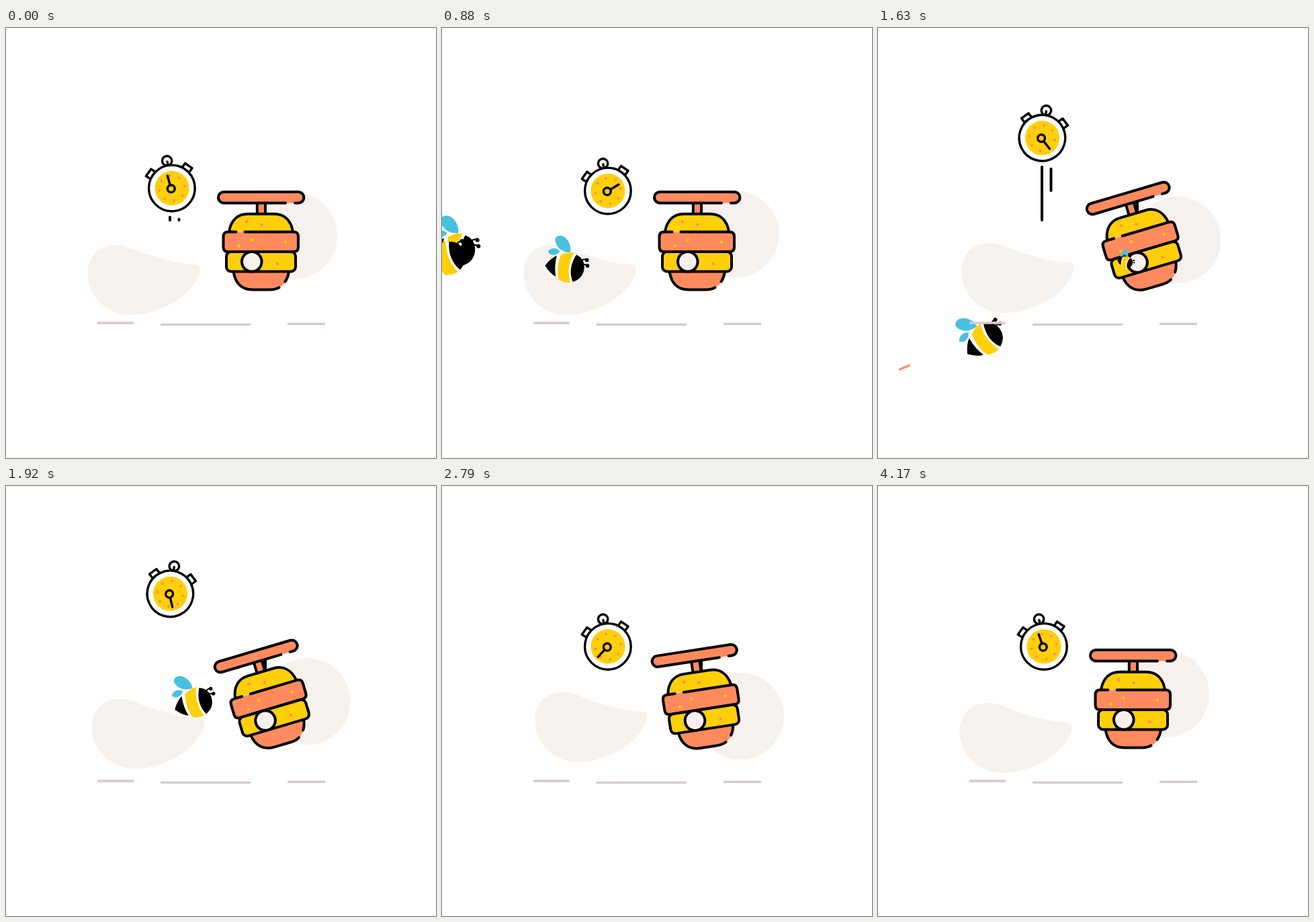
Write an HTML page that moves like this. It is 640 by 640 pixels and loops after 4210 ms.

```html
<!DOCTYPE html>
<html lang="en">
<head>
<meta charset="utf-8">
<title>Bees and hive</title>
<style>
  html, body { margin: 0; width: 100%; height: 100%; overflow: hidden; background: #fff; }
  svg { display: block; width: 100vw; height: 100vh; }
  .ink { stroke: #000; stroke-width: 4; stroke-linecap: round; stroke-linejoin: round; }
  .thin { stroke-width: 3.4; }
  .coral { fill: #ff8a5e; }
  .gold { fill: #ffcf0a; }
  .pale { fill: #f7f1ee; }
  .white { fill: #fff; }
  .sky { fill: #48c0e0; }
  .none { fill: none; }
  .dots { stroke-width: 4.4; stroke-linecap: round; }
</style>
</head>
<body>
<svg viewBox="0 0 640 640">
  <defs>
    <g id="bee">
      <path class="sky" d="M6,-22C-6,-22 -17,-32 -15,-44C-12,-49 -4,-49 1,-43C6,-37 8,-30 6,-22Z"/>
      <path class="sky" d="M-9,-24C-15,-17 -25,-18 -27,-25C-22,-31 -13,-30 -9,-24Z"/>
      <path class="white" d="M-14,-18Q2,-24 15,-18L8,22Q-4,25 -17,13Z"/>
      <path d="M-32,-4Q-24,-14 -14,-18Q-19,-2 -17,13Q-26,8 -32,-4Z"/>
      <path class="gold" d="M-8,-19Q2,-23 12,-21Q-1,-2 4,23Q-6,23 -13,17Q-16,0 -8,-19Z"/>
      <path d="M15,-18Q27,-12 26,2Q24,18 8,22Q1,2 15,-18Z"/>
      <path class="ink none" style="stroke-width:2" d="M21,-8Q25,-12 30,-10M24,-3Q27,-4 30,-1"/>
      <circle cx="30.5" cy="-9.5" r="2.8"/><circle cx="31" cy="-1" r="2.8"/>
    </g>
  </defs>

  <path id="blob" class="pale" d="M121.5,366C121,340 138,323 163,323C182,323 190,331 214,338C238,345 255,350 277,352C287,350 291,356 288,365C283,382 265,400 245,411C225,421 205,427 186,427C147,427 121.5,397 121.5,366Z"/>
  <circle id="disc" class="pale" cx="428.3" cy="309.3" r="64.6"/>

  <path d="M372,258H388V277H372Z"/>
  <g id="hive">
    <path class="ink coral" d="M373.8,260V278H386V260"/>
    <path class="ink coral" d="M430,260.4H435.2a8.2,8.2 0 0 0 0,-16.4H324.2a8.2,8.2 0 0 0 0,16.4H416"/>
    <path class="ink gold" d="M332,303C335,286 345,276.8 360,276.8H399C414,276.8 424,286 427,303"/>
    <path class="coral" d="M338.5,362C341,380 351,389.5 367,389.5H393C409,389.5 419,379 421,362Z"/>
    <path class="ink none" d="M338.5,362C341,380 351,389.5 367,389.5H393Q401,389.5 406.5,386.3M415.5,377.5Q420,371 421,362"/>
    <path class="ink coral" d="M355.5,303.6H428q7,0 7,7V326q0,7 -7,7H330.5q-7,0 -7,-7V310.6q0,-7 7,-7H342.5"/>
    <rect class="ink gold" x="328" y="333" width="103" height="29.5" rx="7"/>
    <circle class="ink pale" cx="365.8" cy="347.8" r="14.8"/>
    <path class="dots" stroke="#ff8a5e" d="M358,288.5h0M380.5,293h0M404,351h0"/>
    <path class="dots" stroke="#ffcf0a" d="M365.5,315.5h0M416,318.5h0M346.5,324.5h0"/>
  </g>

  <path id="speed" class="ink none"/>
  <g id="watch">
    <circle class="ink thin white" cx="239.6" cy="198.2" r="7.2"/>
    <path class="ink thin white" d="M215.8,210.5L222.2,214.8L214.8,225.3L208.3,221ZM266.6,201.8L277,209L272.5,215.5L262,208.3Z"/>
    <circle class="ink thin white" cx="246.9" cy="238.9" r="34.3"/>
    <path class="ink thin none" d="M239.9,199.5L241,205"/>
    <circle class="gold" cx="247" cy="238.9" r="25.6"/>
    <g id="ticks" class="coral"></g>
    <path id="hand" class="ink thin none" d="M245.8,234V219.7"/>
    <circle class="ink thin gold" cx="245.8" cy="239.7" r="5.4"/>
  </g>

  <path id="streak" class="none" stroke="#ff8a5e" stroke-width="3" stroke-linecap="round"/>
  <g id="bees"></g>
  <path class="none" stroke="#d9c8cc" stroke-width="3.4" d="M136,439H190M230,441.4H364M419,440.4H475"/>
</svg>
<script>
const LOOP = 4210, HOP = LOOP / 3, TURN = 2790;
const byId = id => document.getElementById(id);
const make = (tag, parent, attrs) => {
  const node = document.createElementNS('http://www.w3.org/2000/svg', tag);
  for (const key in attrs) node.setAttribute(key, attrs[key]);
  return parent.appendChild(node);
};
const transform = (node, value) => node.setAttribute('transform', value);

// Progress of t from start to end, 0 to 1, and its eased forms.
const ramp = (t, start, end) => Math.min(1, Math.max(0, (t - start) / (end - start)));
const easeIn = (...span) => ramp(...span) ** 2;
const easeOut = (...span) => 1 - (1 - ramp(...span)) ** 2;
const ease = (...span) => { const u = ramp(...span); return u * u * (3 - 2 * u); };

const bezier = (a, b, c, d, u) => {
  const v = 1 - u;
  return a * v ** 3 + 3 * b * v * v * u + 3 * c * v * u * u + d * u ** 3;
};
const bezierSlope = (a, b, c, d, u) => {
  const v = 1 - u;
  return (b - a) * v * v + 2 * (c - b) * u * v + (d - c) * u * u;
};

// Each bee follows one curve into the hive's door.
const flights = [
  { start: 420, end: 1150, size: 1, x: [-45, 90, 164.6, 366], y: [335, 372, 354, 348] },
  { start: 740, end: 1480, size: 1.1, x: [-50, 60, 250, 383], y: [345, 310, 325, 348] },
  { start: 740, end: 1720, size: 1.1, x: [-50, 59, 343, 386], y: [400, 229, 362, 348] },
  { start: 1370, end: 2090, size: 1.05, x: [-50, 240, 191, 386], y: [505, 600, 205, 348] }
];
for (const flight of flights) flight.node = make('use', byId('bees'), { href: '#bee' });

for (let k = 0; k < 8; k++) {
  const a = (45 * k - 100) * Math.PI / 180;
  make('circle', byId('ticks'), { cx: 247 + 19 * Math.cos(a), cy: 239 + 19 * Math.sin(a), r: 1.9 });
}

function drawBackdrop(t) {
  const back = 1 - ease(t, TURN, 3950);
  const rise = 17.3 * ease(t, 1150, 3000) * back;
  transform(byId('blob'), `translate(${rise} ${-0.97 * rise})`);

  const out = ramp(t, 0, TURN);
  const x = bezier(0, 3.7, 31, 16, out) * back, y = bezier(0, -10.4, 6, 33.4, out) * back;
  transform(byId('disc'), `translate(${x} ${y})`);
}

function drawHive(t) {
  const angle = -16.5 * ease(t, 1090, 1600) + 26.2 * ease(t, 2430, 3430) - 9.7 * ease(t, 3450, 4150);
  transform(byId('hive'), `rotate(${angle} 380 278.5)`);
}

function drawWatch(t) {
  const p = t % HOP, up = easeOut(p, 0, 310);
  const y = -81 * up + 84.5 * easeIn(p, 450, 850) - 3.5 * ease(p, 880, 1040);
  const angle = 20 * (up - ease(p, 450, 850));
  transform(byId('watch'), `translate(${-0.135 * angle} ${y}) rotate(${angle} 246.9 238.9)`);
  transform(byId('hand'), `rotate(${t / LOOP * 360 - 16} 245.8 239.7)`);

  const top = 282 + y;
  const line = (x, from, to) => to > from ? `M${x},${from}V${to}` : '';
  const long = 286 - 91 * ease(p, 227, 380), short = 286 - 91 * ease(p, 130, 330);
  byId('speed').setAttribute('d', p > 0 && p < 380 ? line(244, top, long) + line(257.5, top + 3, short) : '');
}

function drawBee({ start, end, size, x, y, node }, t) {
  const u = ramp(t, start, end);
  const heading = Math.atan2(bezierSlope(...y, u), bezierSlope(...x, u)) * 180 / Math.PI;
  const scale = size * Math.min(1, 4 * (1 - u));
  node.setAttribute('visibility', u > 0 && u < 1 ? 'visible' : 'hidden');
  transform(node, `translate(${bezier(...x, u)} ${bezier(...y, u)}) rotate(${heading}) scale(${scale})`);
}

function drawStreak(t) {
  const u = ramp(t, 1540, 1720);
  const point = s => `${4 + 56 * s},${520 - 23.5 * s}`;
  byId('streak').setAttribute('d', u > 0 && u < 1 ? `M${point(u)}L${point(easeOut(u, 0, 1))}` : '');
}

function draw(t) {
  drawBackdrop(t);
  drawHive(t);
  drawWatch(t);
  drawStreak(t);
  for (const flight of flights) drawBee(flight, t);
}

const begin = performance.now();
function tick() {
  draw((performance.now() - begin) % LOOP);
  requestAnimationFrame(tick);
}
draw(0);
requestAnimationFrame(tick);
</script>
</body>
</html>
```
